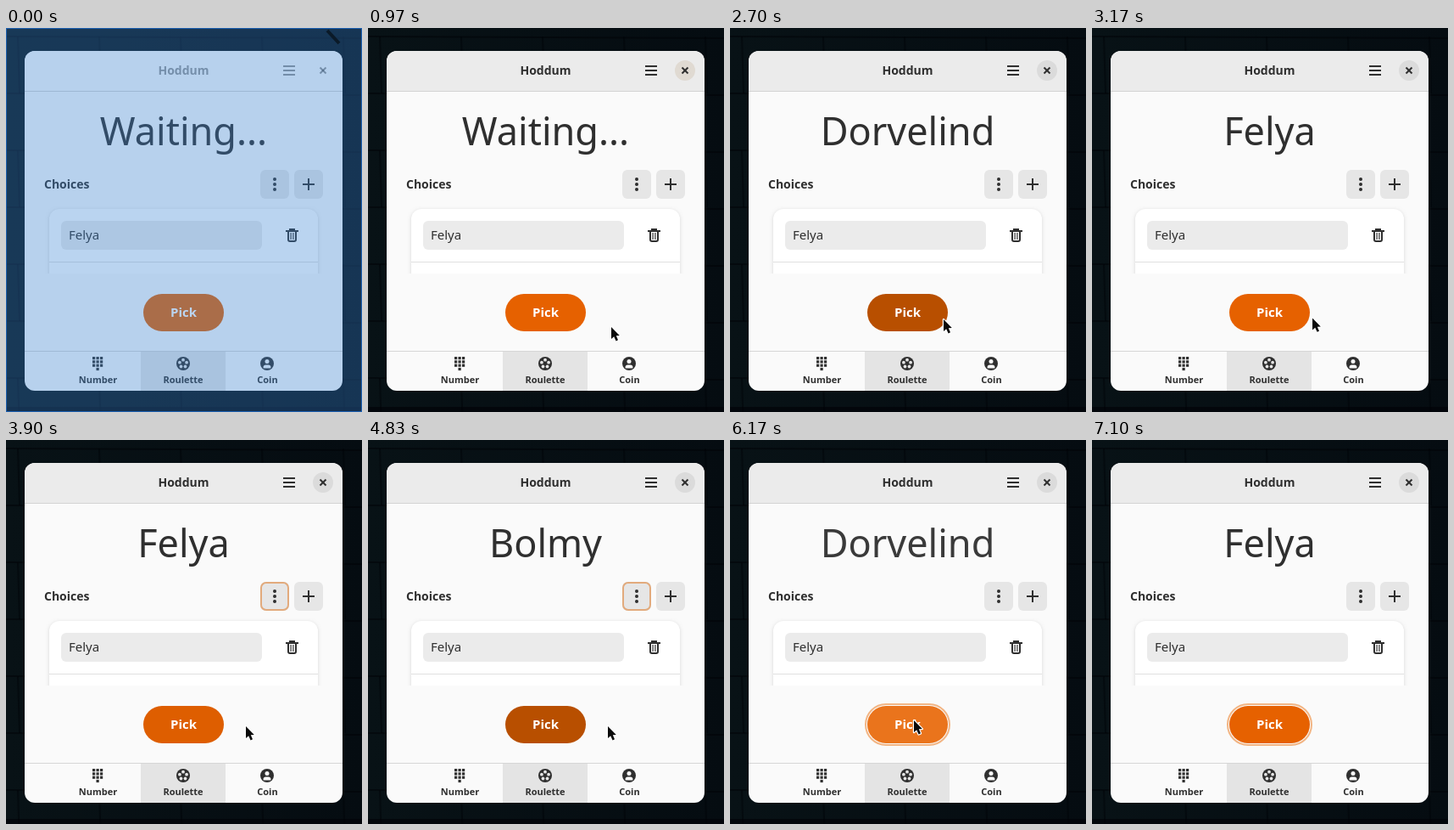
An HTML page with a canvas that plays this animation: 420x452 px, repeating every 7900 ms.

```html
<!DOCTYPE html>
<html lang="en">
<head>
<meta charset="utf-8">
<title>Picker</title>
<style>
  html, body { margin: 0; width: 100%; height: 100%; overflow: hidden; background: #060f14; }
  canvas { display: block; width: 420px; height: 452px; }
</style>
</head>
<body>
<canvas id="stage" width="420" height="452"></canvas>
<script>
const ctx = document.getElementById('stage').getContext('2d');
const LOOP = 7900, TICK = 1000 / 15;
const INK = '#2f2f2f';
const FONT = '"Noto Sans", "Open Sans", sans-serif';

// Each spin shows the names in turn, twice over, and rests on the last one.
const NAMES = ['Bolmy', 'Dorvelind', 'Felya'];
const SPINS = [{ start: 1600, hold: 1300 }, { start: 3950, hold: 1300 }, { start: 5714, hold: 250 }];
const SLOT = 250, SLOTS = NAMES.length * 2, FADE = 50;

const IDLE = [230, 97, 0], HOVER = [234, 116, 28], DOWN = [184, 79, 0];
const WARM = [224, 218, 210], GREY = [219, 219, 219];

// Pointer glides: start time and where it goes.
const GLIDE = 500, ENTRY = [384, 6];
const GLIDES = [[450, 287, 352], [970, 252, 343], [3000, 283, 337], [5100, 217, 330], [6300, 300, 460]];

const ramp = (t, from, to) => Math.max(0, Math.min(1, (t - from) / (to - from)));
const smooth = p => p * p * (3 - 2 * p);
const mix = (a, b, p) => a.map((v, i) => v + (b[i] - v) * p);
const rgb = c => `rgb(${c.map(Math.round)})`;
const tick = t => (Math.floor((t + 4) / TICK - .5) + .5) * TICK;

function rect(x, y, w, h, color) {
  ctx.fillStyle = color;
  ctx.fillRect(x, y, w, h);
}

function round(x, y, w, h, r, fill, stroke, width = 1) {
  ctx.beginPath();
  ctx.roundRect(x, y, w, h, r);
  if (fill) { ctx.fillStyle = fill; ctx.fill(); }
  if (stroke) { ctx.strokeStyle = stroke; ctx.lineWidth = width; ctx.stroke(); }
}

function dot(x, y, r, color = INK) {
  ctx.fillStyle = color;
  ctx.beginPath();
  ctx.arc(x, y, r, 0, Math.PI * 2);
  ctx.fill();
}

function line(x1, y1, x2, y2, color, width) {
  ctx.strokeStyle = color;
  ctx.lineWidth = width;
  ctx.beginPath();
  ctx.moveTo(x1, y1);
  ctx.lineTo(x2, y2);
  ctx.stroke();
}

function text(s, x, y, size, weight = 400, color = INK, align = 'center') {
  ctx.font = `${weight} ${size}px ${FONT}`;
  ctx.textAlign = align;
  ctx.fillStyle = color;
  ctx.fillText(s, x, y);
}

function wall() {
  const g = ctx.createLinearGradient(0, 0, 420, 0);
  g.addColorStop(0, '#081216');
  g.addColorStop(1, '#050c11');
  rect(0, 0, 420, 452, g);
  const seam = 'rgba(0,3,7,.5)';
  for (let row = 0; row < 7; row++) {
    const y = 10 + row * 67;
    line(0, y, 420, y + 2, seam, 2);
    for (let x = 14 + row % 2 * 48; x < 420; x += 96) line(x, y, x + 2, y + 67, seam, 2);
  }
  rect(0, 446, 420, 6, 'rgba(0,0,5,.6)');
}

function header(t) {
  const focused = t >= 200;
  rect(22, 27, 375, 47, focused ? '#ebebeb' : '#fafafa');
  rect(22, 74, 375, 1, '#d3d3d3');
  if (focused) dot(374, 50, 12, rgb(mix(WARM, GREY, ramp(t, 970, 1430))));
  ctx.globalAlpha = focused ? 1 : .5;
  text('Hoddum', 209.5, 55, 14, 700);
  for (let i = 0; i < 3; i++) rect(327, 44 + i * 5, 14, 2, INK);
  line(370.5, 46.5, 377.5, 53.5, INK, 2);
  line(377.5, 46.5, 370.5, 53.5, INK, 2);
  ctx.globalAlpha = 1;
}

function result(t) {
  let word = 'Waiting...', alpha = 1;
  for (const { start } of SPINS) {
    if (t < start) {
      alpha = Math.min(alpha, ramp(start - t, 0, FADE));
      break;
    }
    const slot = Math.min(SLOTS - 1, Math.floor((t - start) / SLOT));
    const age = t - start - slot * SLOT;
    const left = slot < SLOTS - 1 ? SLOT - age : FADE;
    word = NAMES[slot % NAMES.length];
    alpha = ramp(Math.min(age, left), 0, FADE);
  }
  ctx.globalAlpha = alpha;
  text(word, 209.5, 138, 45);
  ctx.globalAlpha = 1;
}

function trash() {
  rect(330, 238, 15, 2, INK);
  rect(334, 236, 7, 2, INK);
  round(333, 239, 9, 12, [0, 0, 2, 2], null, INK, 2);
  rect(335.5, 241, 1.2, 8, INK);
  rect(338.3, 241, 1.2, 8, INK);
}

function choices(t) {
  text('Choices', 45, 189, 14, 700, INK, 'left');
  round(300, 167, 34, 34, 6, '#e6e6e6');
  round(340, 167, 34, 34, 6, '#e6e6e6');
  for (let i = 0; i < 3; i++) dot(317, 178 + i * 6, 2);
  rect(350, 183, 14, 2, INK);
  rect(356, 177, 2, 14, INK);
  if (t >= 3230 && t < 5500) round(301, 168, 32, 32, 6, null, '#e2aa7c', 2);

  ctx.save();
  ctx.beginPath();
  ctx.rect(40, 205, 340, 84);
  ctx.clip();
  ctx.shadowColor = 'rgba(0,0,0,.14)';
  ctx.shadowBlur = 4;
  ctx.shadowOffsetY = 1;
  round(51, 213, 317, 110, 12, '#fff');
  ctx.restore();
  round(65, 227, 237, 34, 6, '#ebebeb');
  text(NAMES[2], 74, 249, 15, 400, INK, 'left');
  trash();
  rect(51, 275, 317, 1, '#e0e0e0');
}

function pick(t) {
  const [x, y] = pointerAt(t);
  const over = x > 162 && x < 250 && y > 313 && y < 357;
  const press = Math.max(...SPINS.map(({ start, hold }) =>
    ramp(t, start - 90, start + 150) * (1 - ramp(t, start + hold, start + hold + 200))));
  round(162, 313, 95, 44, 22, rgb(mix(over ? HOVER : IDLE, DOWN, press)));
  if (t >= 5830) round(160, 311, 99, 48, 24, null, '#f2b584', 2);
  text('Pick', 209.5, 340, 15, 700, '#fff');
}

function tabs() {
  rect(22, 380, 375, 1, '#d6d6d6');
  rect(159, 381, 100, 46, '#e4e4e4');

  for (let k = 0; k < 9; k++) rect(102 + k % 3 * 4.5, 387 + Math.floor(k / 3) * 4.3, 3.2, 3.2, INK);
  rect(106.5, 399.9, 3.2, 3.2, INK);

  dot(209, 395, 8);
  for (let k = 0; k < 5; k++) {
    const a = -Math.PI / 2 + k * Math.PI * .4;
    dot(209 + 4.3 * Math.cos(a), 395 + 4.3 * Math.sin(a), 1.9, '#e4e4e4');
  }

  dot(308, 395, 8);
  dot(308, 392.5, 2.5, '#fafafa');
  round(303.5, 396.5, 9, 4, [4, 4, 1, 1], '#fafafa');

  text('Number', 108.5, 418, 11, 700);
  text('Roulette', 209, 418, 11, 700);
  text('Coin', 308.5, 418, 11, 700);
}

function pointerAt(t) {
  return GLIDES.reduce((pos, [start, ...goal]) =>
    mix(pos, goal, smooth(ramp(t, start, start + GLIDE))), ENTRY);
}

function pointer(t) {
  if (t < GLIDES[0][0]) return;
  ctx.save();
  ctx.translate(...pointerAt(t));
  ctx.lineJoin = 'round';
  const arrow = new Path2D('M0 0V14L3.2 11.2L5.6 16.4L8 15.3L5.8 10.3L9.8 10Z');
  ctx.strokeStyle = '#fff';
  ctx.lineWidth = 2.4;
  ctx.stroke(arrow);
  ctx.fillStyle = '#0a0a0a';
  ctx.fill(arrow);
  ctx.restore();
}

function tint(t) {
  ctx.globalAlpha = 1 - ramp(t, 40, 430);
  rect(0, 0, 420, 452, 'rgba(55,130,210,.346)');
  ctx.strokeStyle = '#1c5fb0';
  ctx.lineWidth = 1;
  ctx.strokeRect(.5, .5, 419, 451);
  if (t < 95) line(379, 3, 393, 18, '#0b1a28', 4);
  ctx.globalAlpha = 1;
}

function draw(t) {
  wall();
  ctx.save();
  ctx.beginPath();
  ctx.roundRect(22, 27, 375, 400, 12);
  ctx.clip();
  rect(22, 27, 375, 400, '#fafafa');
  header(t);
  result(t);
  choices(t);
  pick(t);
  tabs();
  ctx.restore();
  pointer(t);
  tint(t);
}

const begin = performance.now();
function frame() {
  draw(tick((performance.now() - begin) % LOOP));
  requestAnimationFrame(frame);
}
frame();
</script>
</body>
</html>
```
